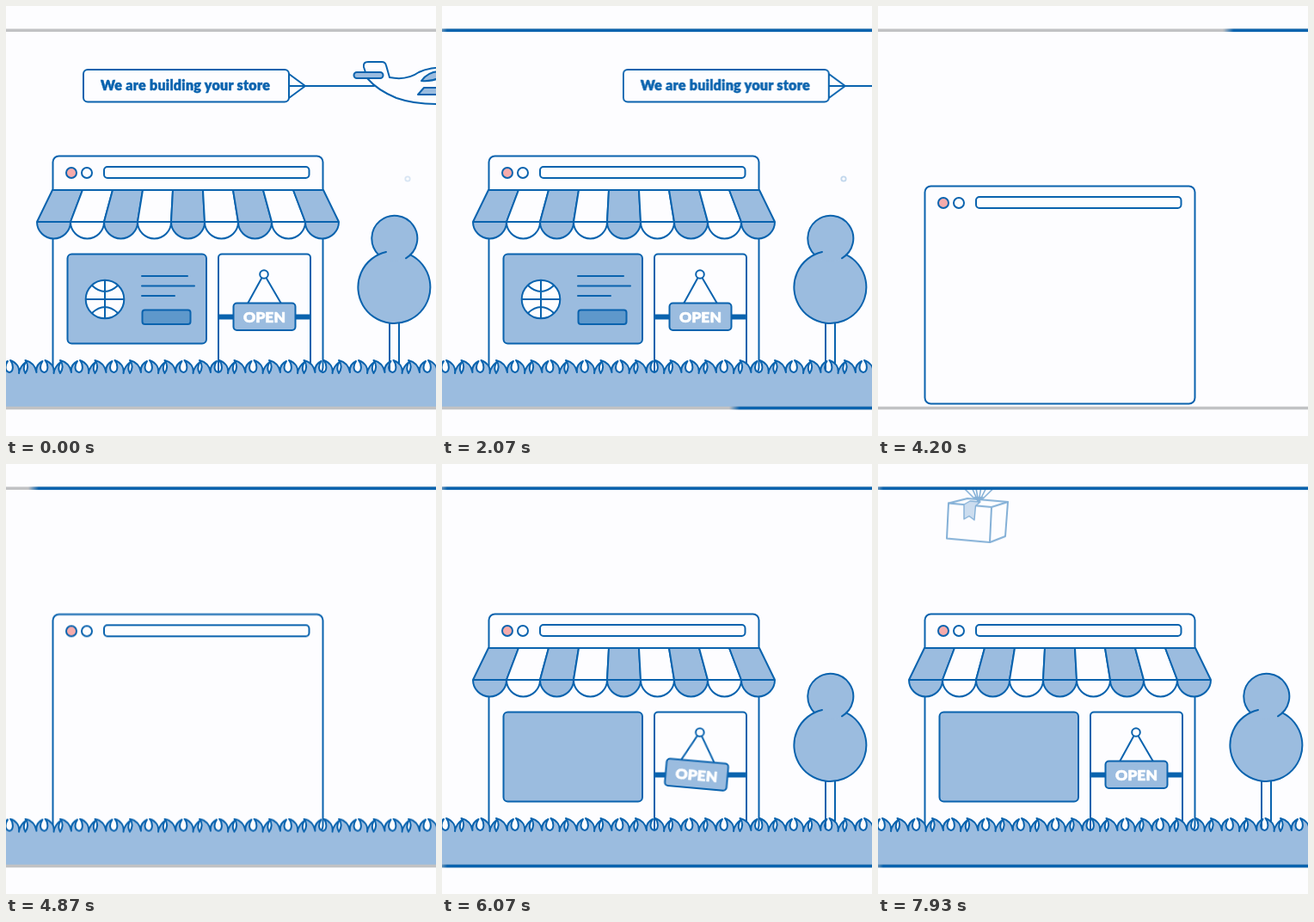
An HTML page that plays this animation: 500x500 px, repeating every 8 s.

```html
<!DOCTYPE html>
<html lang="en">
<head>
<meta charset="utf-8">
<title>Store under construction</title>
<style>
  html, body { margin: 0; width: 100%; height: 100%; overflow: hidden; background: #fdfdff; }
  svg { display: block; width: 100vw; height: 100vh; }
  .ink { fill: none; stroke: #0a63ae; stroke-width: 2; stroke-linejoin: round; stroke-linecap: round; }
  .paper { fill: #fdfdff; }
  .tint { fill: #9bbcdf; }
  text { font-family: Lato, "Open Sans", sans-serif; font-weight: 900; text-anchor: middle; stroke-linejoin: round; }
  #sign { transform-origin: 299px 310px; }
</style>
</head>
<body>
<svg viewBox="0 0 500 500">
  <defs>
    <clipPath id="view"><rect y="30" width="500" height="437"/></clipPath>
    <linearGradient id="soft">
      <stop offset="0" stop-color="#0a63ae" stop-opacity="0"/>
      <stop offset=".023" stop-color="#0a63ae"/>
    </linearGradient>
  </defs>

  <g class="ink" clip-path="url(#view)">
    <circle id="dot" cx="467" cy="201" r="2.7" stroke="#6a9fd2" stroke-width="1.8"/>

    <g id="plane">
      <path d="M329 93H428M329 79L348 93L329 107"/>
      <rect class="paper" x="90" y="74" width="239" height="37.5" rx="5"/>
      <text x="208.5" y="98" font-size="16" letter-spacing=".3" fill="#0a63ae" stroke-width=".5">We are building your store</text>
      <path class="paper" d="M419 80L416 71Q415 65 421 65H437Q441 65 442 69L446 83Q466 87 480 77Q492 71 515 71Q570 72 570 93Q560 114 500 114Q474 114 454 107Q432 98 420 84Z"/>
      <rect class="tint" x="404.500" y="77" width="34" height="7" rx="3.500"/>
      <path class="tint" d="M483 87Q490 77 503 76V84Q494 88 483 87ZM479 103L486 95H512V103Z"/>
    </g>

    <g id="tree">
      <path class="paper" d="M446 365V430H457V365"/>
      <g class="tint" stroke="none">
        <circle cx="451.500" cy="327" r="42"/>
        <circle cx="451.500" cy="270.500" r="26.500"/>
      </g>
      <path d="M442 286A42 42 0 1 0 469.800 289.200M433.200 289.200A26.500 26.500 0 1 1 465 293.300"/>
    </g>

    <g id="shop">
      <rect class="paper" x="54.500" y="174.500" width="314" height="253" rx="7"/>
      <circle cx="76" cy="194" r="6" fill="#f6abab"/>
      <circle cx="94" cy="194" r="6"/>
      <rect x="114" y="187" width="238.500" height="13" rx="4"/>
    </g>

    <g id="awning"></g>

    <g id="card">
      <rect class="tint" x="71.500" y="288.500" width="161.500" height="104" rx="5"/>
    </g>
    <g id="content">
      <circle class="paper" cx="115" cy="341" r="22.300"/>
      <path d="M115 319V363M93 341H137M100 325Q115 339 130 325M100 357Q115 343 130 357"/>
      <path d="M158 314H211M158 325.500H219M158 337H196"/>
      <rect x="158.500" y="353.500" width="56" height="16.500" rx="3" fill="#5e98cb"/>
    </g>

    <g id="door">
      <rect class="paper" x="247" y="288.500" width="107" height="145" rx="4"/>
      <path d="M248 361.500H353" stroke-width="6" stroke-linecap="butt"/>
      <g id="sign">
        <path d="M297.500 316L281 346M302.500 316L320 346"/>
        <circle class="paper" cx="300" cy="312" r="4.800"/>
        <rect class="tint" x="264.500" y="345.500" width="72" height="31.500" rx="4"/>
        <text x="300.500" y="368" font-size="17.500" fill="#fff" stroke="#fff" stroke-width=".6">OPEN</text>
      </g>
    </g>

    <path id="grass" class="tint"/>

    <g id="parcel">
      <path d="M117 45L72 0M117 45L97 0M117 45L109 0M117 45L124 0M117 45L140 0M117 45L163 0" stroke-width="1.600"/>
      <path class="paper" d="M82 45.500L104 40L151 44L148 84L130 91L80 86.500Z"/>
      <path d="M82 45.500L132 50L151 44M132 50L130 91"/>
      <path class="tint" d="M100 47V64L106 60.500L112 65L113.500 48.500L119 44L107 43Z" stroke-width="1.400"/>
      <path d="M111 38L117 45L123 38" fill="#0a63ae" stroke="none"/>
    </g>
  </g>

  <path d="M0 28.300H500M0 467.500H500" stroke="#c1c2c4" stroke-width="3.500"/>
  <rect id="topBar" x="-6" y="26.500" width="520" height="3.600" fill="url(#soft)"/>
  <rect id="lowBar" x="-6" y="465.700" width="520" height="3.600" fill="url(#soft)"/>
</svg>

<script>
const LOOP = 8000, CUT = 2700;
const $ = id => document.getElementById(id);

// Nine awning stripes, each ending in a half-round scallop
let stripes = '';
for (let i = 0; i < 9; i++) {
  const top = 54 + 35 * i, low = 36 + 39 * i;
  stripes += `<path class="${i % 2 ? 'paper' : 'tint'}" d="M${top} 214H${top + 35}L${low + 39} 251A19.5 19.5 0 0 1 ${low} 251L${top} 214M${low} 251H${low + 39}"/>`;
}
$('awning').innerHTML = stripes;

// One tuft of grass, repeated along the ground
const tuft = 'c3 -4 4 -10 0 -15c8 2 12 8 13 14c-1 -7 3 -11 7 -13c-4 6 -3 12 2 13c5 -1 5 -9 1 -14c8 3 11 9 10 15c1 -7 4 -10 8 -13c-3 5 -3 9 -.5 13';
$('grass').setAttribute('d', 'M-18 427' + tuft.repeat(14) + 'V530H-18Z');

// steps: [ms, value, easing to the next step]
function play(id, prop, steps) {
  const frames = steps.map(([ms, value, easing = 'linear']) => ({ offset: ms / LOOP, [prop]: value, easing }));
  frames.unshift({ ...frames[0], offset: 0, easing: 'linear' });
  frames.push({ ...frames[frames.length - 1], offset: 1 });
  $(id).animate(frames, { duration: LOOP, iterations: Infinity });
}
const shiftX = x => `translateX(${x}px)`;
const shiftY = y => `translateY(${y}px)`;
const turn = a => `rotate(${a}deg)`;

// Shown until the cut, then faded in again
const fades = {
  shop: [3670, 4000], awning: [4980, 5370], card: [4960, 5330],
  door: [5120, 5500], tree: [5255, 5650]
};
for (const [id, [from, to]] of Object.entries(fades))
  play(id, 'opacity', [[CUT, 1], [CUT, 0], [from, 0], [to, 1]]);

for (const id of ['content', 'plane'])
  play(id, 'opacity', [[CUT, 1], [CUT, 0]]);
play('dot', 'opacity', [[0, .25], [1200, .8], [2400, .25], [CUT, .4], [CUT, 0]]);
play('plane', 'transform', [[0, shiftX(0)], [CUT, shiftX(157.5)]]);

play('shop', 'transform', [[CUT, shiftY(0)], [CUT, shiftY(35)], [4480, shiftY(35), 'ease-in-out'], [4900, shiftY(0)]]);
play('grass', 'transform', [[CUT, shiftY(0)], [CUT, shiftY(62)], [4480, shiftY(62), 'ease-out'], [4900, shiftY(0)]]);

const swing = [[5130, 62], [5270, 58], [5500, -34], [5710, 20], [5900, -9], [6070, 5], [6260, -2], [6450, 0]];
play('sign', 'transform', [[CUT, turn(0)], [CUT, turn(62)],
  ...swing.map(([ms, a]) => [ms, turn(a), 'ease-in-out'])]);

// Blue border sweeps in from the right
const sweep = (id, first, second) => play(id, 'transform', [
  [first, shiftX(506)], [first + 903, shiftX(0)], [CUT, shiftX(0)],
  [CUT, shiftX(506)], [second, shiftX(506)], [second + 903, shiftX(0)]
]);
sweep('topBar', 896, 4025);
sweep('lowBar', 1775, 4904);

play('parcel', 'opacity', [[7600, 0], [7930, .5], [8000, .6]]);
play('parcel', 'transform', [[7600, shiftY(-40)], [7930, shiftY(0)], [8000, shiftY(8)]]);
</script>
</body>
</html>
```
